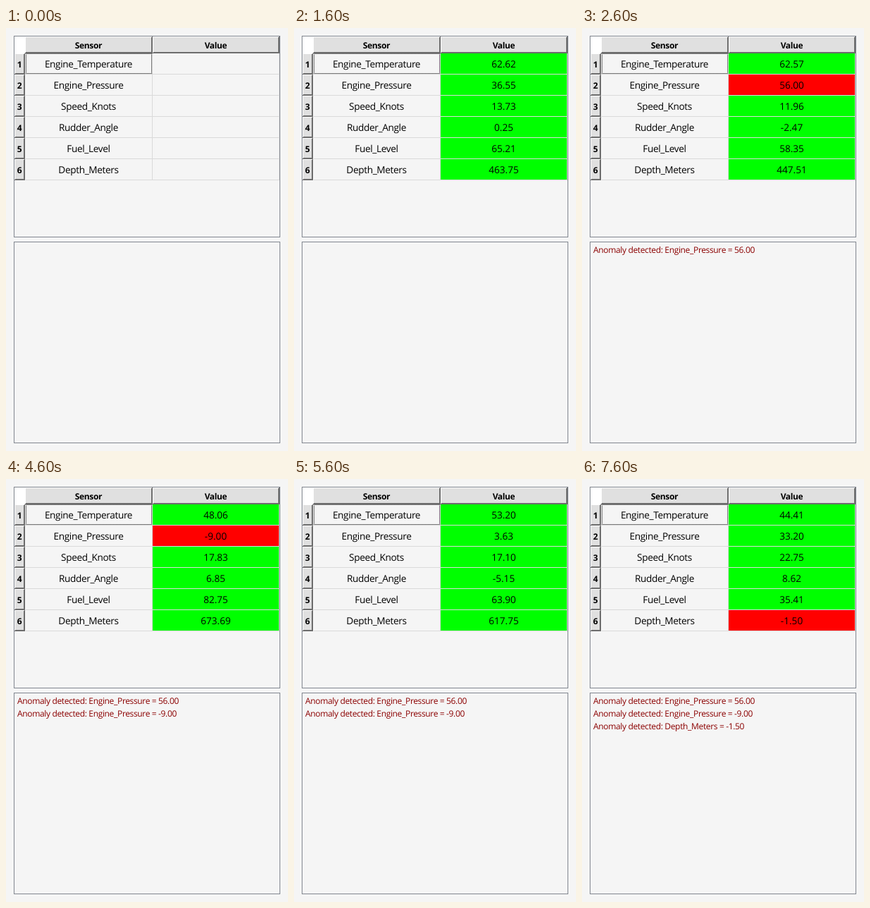
Write an HTML page with a canvas that moves like this. It is 400 by 600 pixels and loops after 8000 ms.

```html
<!DOCTYPE html>
<html lang="en">
<head>
<meta charset="utf-8">
<title>Sensor monitor</title>
<style>
html, body { margin: 0; height: 100%; overflow: hidden; background: #f5f5f5; }
canvas { display: block; }
</style>
</head>
<body>
<canvas id="stage" width="400" height="600"></canvas>
<script>
const ctx = document.getElementById('stage').getContext('2d');
const LOOP = 8000, FIRST = 600, STEP = 1000, UPDATES = 8;
const FONT = '"Open Sans", "Noto Sans", sans-serif';
const GRID = '#dadada', FRAME = '#828790';

// Key readings fall on every second update and on the last one
const sensors = [
  { name: 'Engine_Temperature', keys: [62.67, 62.57, 48.06, 58.33, 44.41] },
  { name: 'Engine_Pressure', keys: [17.10, 56, -9, 16.26, 33.20], min: 0, max: 50 },
  { name: 'Speed_Knots', keys: [15.50, 11.96, 17.83, 16.37, 22.75] },
  { name: 'Rudder_Angle', keys: [2.98, -2.47, 6.85, -17.14, 8.62] },
  { name: 'Fuel_Level', keys: [72.07, 58.35, 82.75, 45.05, 35.41] },
  { name: 'Depth_Meters', keys: [479.99, 447.51, 673.69, 561.80, -1.50], min: 0 }
];

// Updates between two keys take their midpoint
function reading({ keys }, update) {
  const k = update / 2;
  if (update === UPDATES - 1) return keys.at(-1);
  return (keys[Math.floor(k)] + keys[Math.ceil(k)]) / 2;
}

const isAnomaly = ({ min = -Infinity, max = Infinity }, value) => value < min || value > max;

function rect(x, y, w, h, color) {
  ctx.fillStyle = color;
  ctx.fillRect(x, y, w, h);
}

function panel(y) {
  rect(11, y, 378, 286, FRAME);
  rect(12, y + 1, 376, 284, '#f5f5f5');
}

function text(str, x, y, font, { align = 'center', color = '#000', spacing = -.35 } = {}) {
  ctx.font = `${font} ${FONT}`;
  ctx.letterSpacing = `${spacing}px`;
  ctx.textAlign = align;
  ctx.fillStyle = color;
  ctx.fillText(str, x, y);
}

// Raised header section with a label
function header(label, x, y, w, h, baseline) {
  rect(x, y, w, h, '#696969');
  rect(x, y, w - 1, h - 1, '#fff');
  rect(x + 1, y + 1, w - 2, h - 2, '#707070');
  rect(x + 1, y + 1, w - 3, h - 3, '#e0e0e0');
  text(label, x + w / 2 - .5, baseline, 'bold 12px');
}

// Rectangle of alternating single pixels
function dotted(x, y, w, h) {
  for (let i = 0; i < w; i += 2) {
    rect(x + i, y, 1, 1, '#000');
    rect(x + i, y + h - 1, 1, 1, '#000');
  }
  for (let j = 0; j < h; j += 2) {
    rect(x, y + j, 1, 1, '#000');
    rect(x + w - 1, y + j, 1, 1, '#000');
  }
}

function drawTable(update) {
  panel(11);
  rect(12, 12, 15, 24, '#fff');
  header('Sensor', 27, 12, 181, 24, 29);
  header('Value', 208, 12, 180, 24, 29);
  sensors.forEach((sensor, i) => {
    const y = 36 + i * 30, baseline = y + 20;
    header(i + 1, 12, y, 15, 30, baseline);
    rect(28, y + 29, 360, 1, GRID);
    rect(207, y, 1, 30, GRID);
    rect(387, y, 1, 30, GRID);
    text(sensor.name, 117, baseline, '13.6px');
    if (update < 0) return;
    const value = reading(sensor, update);
    rect(208, y, 179, 29, isAnomaly(sensor, value) ? '#f00' : '#0f0');
    text(value.toFixed(2), 297.5, baseline, '13.6px', { spacing: 0 });
  });
  dotted(28, 36, 179, 29);
}

function drawLog(update) {
  panel(303);
  let y = 319;
  for (let u = 0; u <= update; u++) {
    for (const sensor of sensors) {
      const value = reading(sensor, u);
      if (!isAnomaly(sensor, value)) continue;
      text(`Anomaly detected: ${sensor.name} = ${value.toFixed(2)}`, 16, y, '12px',
           { align: 'left', color: '#8b0000' });
      y += 18;
    }
  }
}

function draw() {
  const update = Math.floor((performance.now() % LOOP - FIRST) / STEP);
  rect(0, 0, 400, 600, '#f5f5f5');
  drawTable(update);
  drawLog(update);
  requestAnimationFrame(draw);
}

ctx.textRendering = 'geometricPrecision';
draw();
</script>
</body>
</html>
```
